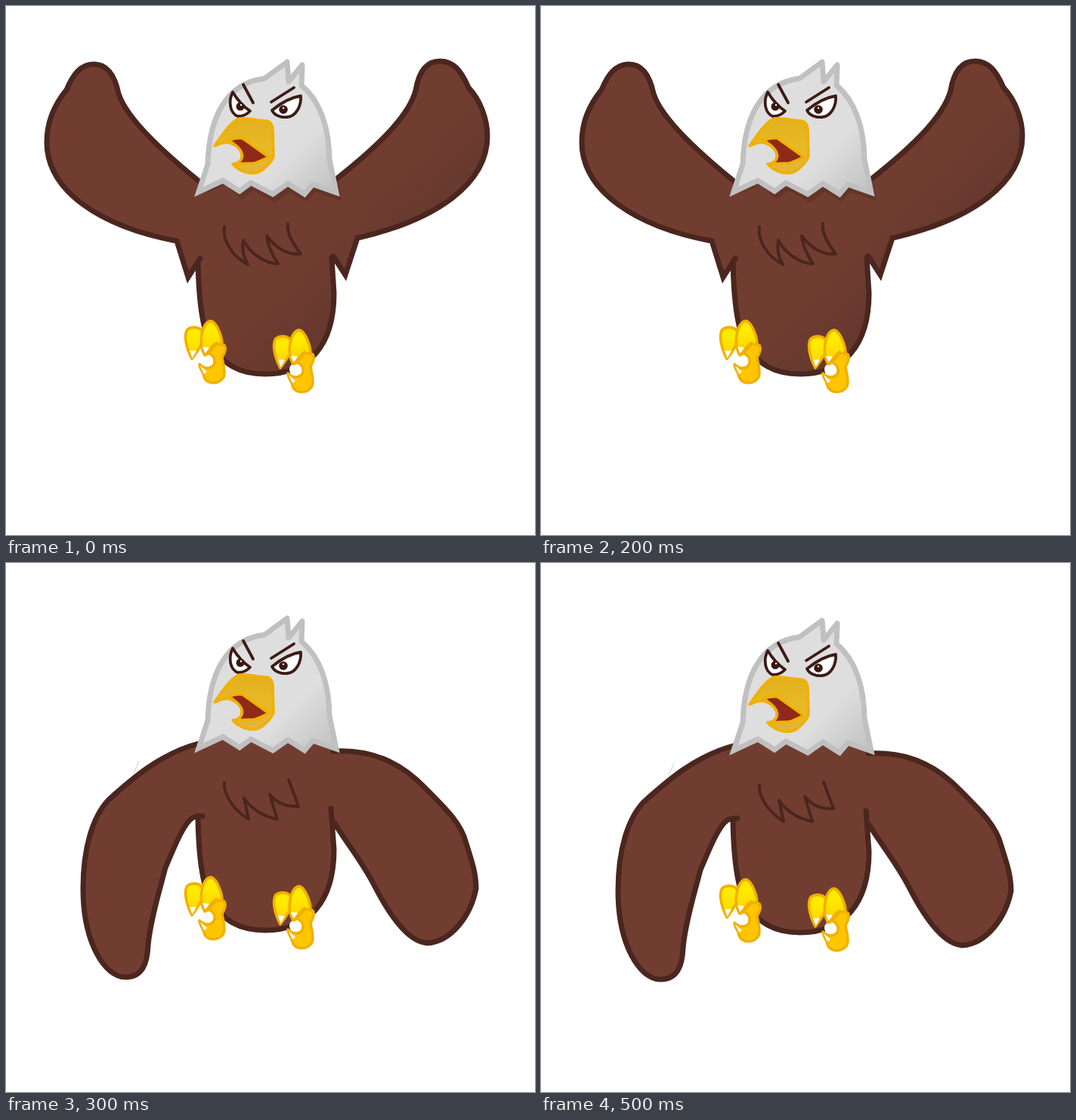
Animation of 700x700 px, one loop 0.6 s. Source, as an HTML page:

```html
<!DOCTYPE html>
<html lang="en">
<head>
<meta charset="utf-8">
<title>Flapping eagle</title>
<style>
  html, body { margin: 0; width: 100%; height: 100%; overflow: hidden; background: #fff; }
  svg { display: block; width: 100vw; height: 100vh; }
  .line { fill: none; stroke: #4a261f; stroke-width: 7; stroke-linecap: round; }
  .thin { stroke-width: 4; stroke-linejoin: round; }
  .face { stroke: #3d1b15; stroke-width: 3.8; stroke-linecap: round; stroke-linejoin: round; }
  .gold { stroke: #f1b000; stroke-width: 3.6; stroke-linejoin: round; stroke-linecap: round; }
</style>
</head>
<body>
<svg viewBox="0 0 700 700">
  <defs>
    <linearGradient id="brown" gradientUnits="userSpaceOnUse" x1="358" y1="358" x2="435" y2="435">
      <stop stop-color="#723d31"/><stop offset="1" stop-color="#65382d"/>
    </linearGradient>
    <linearGradient id="grey" gradientUnits="userSpaceOnUse" x1="286" y1="286" x2="336" y2="336">
      <stop stop-color="#dedede"/><stop offset="1" stop-color="#c4c4c4"/>
    </linearGradient>
    <linearGradient id="beak" x2="0" y2="1">
      <stop stop-color="#e3b01d"/><stop offset=".5" stop-color="#e8b926"/><stop offset="1" stop-color="#e2b43a"/>
    </linearGradient>
    <linearGradient id="toe" x2="0" y2="1">
      <stop offset=".3" stop-color="#ffea00"/><stop offset="1" stop-color="#ffd000"/>
    </linearGradient>
    <path id="skull" d="M255 246L267 211C268 150 290 102 342 96L372 74L374 100L392 78L391 105C415 125 428 160 428 205L437 247L406 236L395 249L373 235L353 249L324 234L309 245L287 231Z"/>
    <g id="foot">
      <circle cx="267" cy="469" r="9" fill="#fff"/>
      <path class="gold" fill="#ffc600" d="M279 446L289 449C292 454 289 460 286 465C287 475 291 482 288 491C283 501 265 502 262 490C261 484 256 480 256 474C262 481 274 481 276 472C277 464 271 460 266 459L272 450Z"/>
      <path fill="#fff" d="M257 476L266 484L262 487Z"/>
      <path class="gold" fill="url(#toe)" d="M246 467C238 452 235 435 240 428C247 423 257 425 260 431L260 445C257 451 252 459 246 467Z"/>
      <path fill="#fff" d="M243 456L252 456L246.500 466Z"/>
      <path class="gold" fill="url(#toe)" d="M263 462C256 450 258 438 260 430C263 420 268 416 272 417C279 420 286 437 286 448L279 447C274 451 269 461 263 462Z"/>
      <path fill="#fff" d="M260 451L269 452L264 461Z"/>
      <path class="gold" fill="none" d="M264 461C268 459 271 450 278 446"/>
    </g>
  </defs>

  <g id="up">
    <path fill="url(#brown)" d="M258 234C210 195 160 150 149 116C144 92 134 77 116 77C98 77 88 92 80 111C62 133 54 155 54 180C54 245 125 292 226 311L241 359L257 334C256 390 261 425 269 443C285 475 310 487 343 487C400 487 434 450 434 380L431 331L449 356L465 307C570 283 637 235 637 172C637 150 628 125 612 108C602 85 592 73 574 73C556 73 546 88 542 112C532 150 480 195 437 229Z"/>
    <path class="line" d="M258 234C210 195 160 150 149 116C144 92 134 77 116 77C98 77 88 92 80 111C62 133 54 155 54 180C54 245 125 292 226 311L241 359L257 334M254 338C255 390 260 425 269 443C285 475 310 487 343 487C400 487 434 450 434 380L431 333M433 331L449 356L465 307C570 283 637 235 637 172C637 150 628 125 612 108C602 85 592 73 574 73C556 73 546 88 542 112C532 150 480 195 437 229" stroke-miterlimit="8"/>
    <path class="line thin" d="M289 292C286 310 300 332 320 342C314 332 312 320 314 310C325 330 345 341 360 341C352 330 346 315 345 304C358 322 375 330 390 328C380 315 371 300 373 288"/>
    <path fill="#633529" d="M268 247L290 237L312 256L327 244L356 260L375 246L398 259L409 246L444 258L441 235H268Z"/>
  </g>

  <g id="down">
    <path fill="none" stroke="#ccc" d="M169 277L176 261"/>
    <path fill="#723d31" d="M290 225L258 237C205 250 165 286 135 313C115 335 102 375 102 430C102 500 130 547 158 547C180 547 187 530 188 505C191 470 204 430 211 402C220 382 234 344 249 336L254 338C255 388 260 423 269 441C285 473 310 485 343 485C400 485 434 448 434 378L434 342C448 366 472 395 488 427C505 460 530 500 557 502C590 500 615 465 622 430C622 410 617 395 609 370C603 345 585 327 555 297C520 260 480 245 433 248L405 225Z"/>
    <path class="line" d="M258 237C205 250 165 286 135 313C115 335 102 375 102 430C102 500 130 547 158 547C180 547 187 530 188 505C191 470 204 430 211 402C220 382 234 344 247 336Q252 333 260 334M254 338C255 388 260 423 269 441C285 473 310 485 343 485C400 485 434 448 434 378L430 324M434 342C448 366 472 395 488 427C505 460 530 500 557 502C590 500 615 465 622 430C622 410 617 395 609 370C603 345 585 327 555 297C520 260 480 245 433 248"/>
    <path class="line thin" d="M289 290C288 305 300 325 321 338L315 310C325 325 342 335 359 338L349 305C357 315 370 322 387 321L374 286"/>
  </g>

  <g id="shared">
    <use href="#skull" fill="url(#grey)"/>
    <g fill="none" stroke="#c0c0c0" stroke-width="7">
      <path stroke-linejoin="round" d="M267 211C268 150 290 102 342 96L372 74L374 100L392 78L391 105C415 125 428 160 428 205"/>
      <path d="M267 209L255 246L287 231L309 245L324 234L353 249L373 235L395 249L406 236L437 247L428 203"/>
    </g>
    <g class="face" fill="#fff">
      <path d="M300 114C294 126 296 142 307 146C313 146 319 143 323 139C314 133 306 124 300 114Z"/>
      <path d="M390 119C376 121 363 129 352 138C355 145 365 148 372 147C384 146 391 132 390 119Z"/>
      <path d="M314 104L327 128M351 127L381 108"/>
    </g>
    <g fill="#3a1712">
      <circle cx="310" cy="133" r="5.500"/><circle cx="367" cy="137" r="5.800"/>
    </g>
    <g fill="#fff">
      <circle cx="311" cy="131" r="1.200"/><circle cx="367" cy="135" r="1.200"/>
    </g>
    <path class="gold" fill="url(#beak)" d="M276 185C287 170 297 153 309 149C322 148 334 152 345 152Q352 153 353 163L354 199C351 208 344 213 339 217C332 222 325 222 318 220C311 218 305 215 300 209C309 209 313 205 312 198C313 191 305 184 296 181C289 179 282 183 276 185Z"/>
    <path class="gold" fill="#8f2a19" d="M294 178C301 175 307 174 313 175L348 200C340 203 335 207 328 208L303 209C310 207 314 201 312 195C310 188 301 181 294 178Z"/>
    <use href="#foot"/>
    <use href="#foot" x="117" y="12"/>
  </g>
</svg>
<script>
  const [up, down, shared] = ["up", "down", "shared"].map(id => document.getElementById(id));
  const STEP = 100;
  const BOB = [0, -2, 0, -1, 0, 2]; // vertical bounce per beat

  function draw(now) {
    const beat = Math.floor(now / STEP) % BOB.length;
    const raised = beat % 2 === 0;
    up.style.display = raised ? "" : "none";
    down.style.display = raised ? "none" : "";
    down.setAttribute("transform", `translate(0 ${BOB[beat] + 2})`);
    shared.setAttribute("transform", `translate(0 ${BOB[beat]})`);
  }

  function tick() {
    draw(performance.now());
    requestAnimationFrame(tick);
  }
  tick();
</script>
</body>
</html>
```
